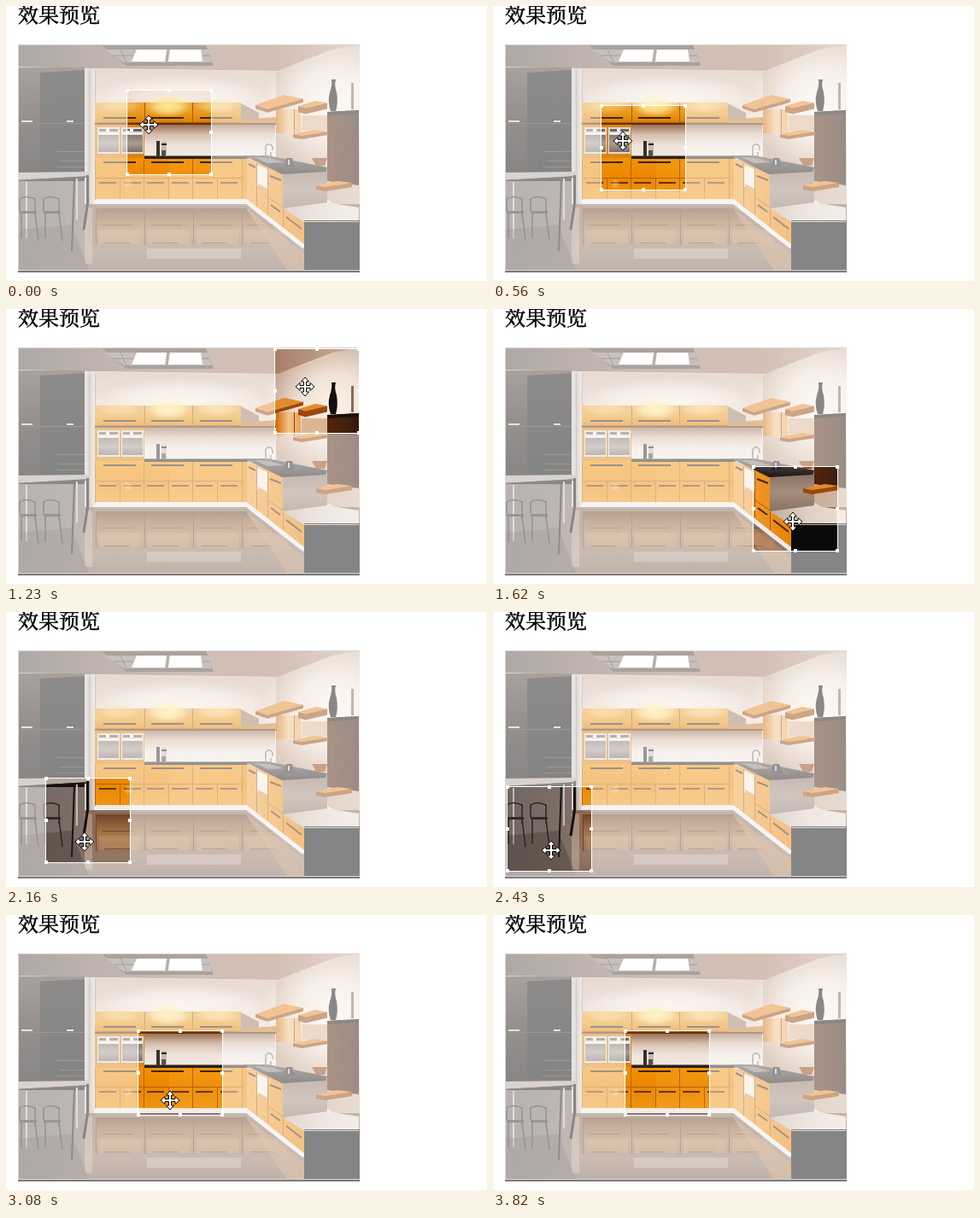
An HTML page with a canvas for the animation above (4610 ms loop, 563 px wide and 322 px high).

```html
<!DOCTYPE html>
<html lang="zh">
<head>
<meta charset="utf-8">
<style>
html, body { margin: 0; width: 563px; height: 322px; overflow: hidden; background: #fff; }
h2 { position: absolute; left: 14px; top: -8px; margin: 0; color: #000; white-space: nowrap;
  font: 400 24px/34px "Noto Serif CJK SC", "Noto Sans CJK SC", "Noto Sans CJK", serif;
  -webkit-text-stroke: .5px #000; }
canvas { position: absolute; left: 0; top: 0; }
</style>
</head>
<body>
<canvas id="stage" width="563" height="322"></canvas>
<h2>效果预览</h2>
<script>
const W = 563, H = 322, LOOP = 4610, SIZE = 100;
const FIRST_MOVE = 410, TICK = 134.4;
const IMG = [14, 45, 400, 266];
const ctx = document.getElementById('stage').getContext('2d');

// Drag path: tick, crop left, crop top, pointer offset inside the crop
const path = [
  [0, 141, 98, 26, 41], [1, 135, 119, 26, 41], [4, 108, 109, 27, 45],
  [6, 288, 57, 29, 43], [7, 314, 46, 36, 45], [9, 307, 157, 48, 60],
  [11, 301, 211, 46, 70], [13, 73, 190, 46, 75], [15, 18, 197, 46, 75],
  [17, 14, 211, 58, 74], [18, 91, 161, 59, 74], [20, 154, 135, 38, 82],
  [21, 154, 135, 38, 82], [22, 154, 135, 55, 92], [23, 154, 135, 237, 113],
  [24, 154, 135, 250, 126]
];

function poseAt(tick) {
  const i = path.findIndex(k => k[0] >= tick);
  if (i < 0) return path.at(-1).slice(1);
  const b = path[i], a = path[i - 1] || b;
  const u = (tick - a[0]) / (b[0] - a[0] || 1);
  return a.map((v, j) => Math.round(v + (b[j] - v) * u)).slice(1);
}

function makeScene() {
  const canvas = document.createElement('canvas');
  canvas.width = W;
  canvas.height = H;
  const c = canvas.getContext('2d');

  const grad = (x0, y0, x1, y1, ...colors) => {
    const g = c.createLinearGradient(x0, y0, x1, y1);
    colors.forEach((col, i) => g.addColorStop(i / (colors.length - 1), col));
    return g;
  };
  const down = (y, h, ...colors) => grad(0, y, 0, y + h, ...colors);
  const across = (x, w, ...colors) => grad(x, 0, x + w, 0, ...colors);
  const rect = (fill, x, y, w, h) => { c.fillStyle = fill; c.fillRect(x, y, w, h); };
  const shape = (fill, d) => { c.fillStyle = fill; c.fill(new Path2D(d)); };
  const line = (color, width, d) => {
    c.strokeStyle = color;
    c.lineWidth = width;
    c.stroke(new Path2D(d));
  };
  const glow = (x, y, rx, ry, rgb, a) => {
    c.save();
    c.translate(x, y);
    c.scale(rx, ry);
    const g = c.createRadialGradient(0, 0, 0, 0, 0, 1);
    g.addColorStop(0, `rgba(${rgb},${a})`);
    g.addColorStop(.5, `rgba(${rgb},${a * .75})`);
    g.addColorStop(1, `rgba(${rgb},0)`);
    rect(g, -1, -1, 2, 2);
    c.restore();
  };
  // tilted board with a dark front edge
  const shelf = (x, y, w, rise, h) => {
    shape('#e48a26', `M${x} ${y}l${w * .6} ${-rise}l${w * .4} ${rise * .4}l${-w * .75} ${rise}z`);
    shape('#9a480c', `M${x} ${y}l${w * .25} ${rise * .4}l${w * .75} ${-rise}v${h}l${-w * .75} ${rise}l${-w * .25} ${-rise * .4}z`);
  };

  c.beginPath();
  c.rect(...IMG);
  c.clip();

  // walls and ceiling
  rect(down(72, 100, '#cfb4a2', '#e3d2c5', '#efe4db'), 14, 45, 400, 266);
  shape(across(316, 98, '#bf9c85', '#d2b8a5'), 'M316 76L414 45V250L316 190Z');
  glow(382, 115, 82, 78, '255,247,238', .95);
  glow(205, 108, 105, 28, '255,246,235', .8);
  shape(across(14, 400, '#5d514b', '#80685d', '#a27f6b', '#a87f68', '#cdb09d'),
    'M14 45H414L382 51 318 76 104 73 14 71Z');
  line('#d8c4b6', 1, 'M104 73.5L318 76.5');

  // ceiling lamp
  shape('#54443b', 'M111 45H234L243 70H141Z');
  shape('#8f8178', 'M116 51H237L241 66H138Z');
  shape('#fff', 'M153 51H188L186 65H147ZM192 51H228L230 65H190Z');
  line('#493a32', 1, 'M126 58H149M190 51L188 66M230 58H239M134 51L141 66');

  // dark alcove and pillar
  rect(down(72, 120, '#50433d', '#2a211d', '#120e0d'), 14, 72, 78, 165);
  shape(down(76, 119, '#191615', '#080808'), 'M40 78L92 75V195H40Z');
  line('#3b332f', 1, 'M14 137.5H92M58 170.5H92M62 181.5H92M58 188.5H92');
  rect('#ddc89b', 18, 134, 13, 2);
  rect('#ddc89b', 71, 134, 8, 2);
  rect(across(92, 13, '#d9d0ca', '#c3b7af', '#e9e0d9'), 92, 73, 13, 163);
  line('#9d9088', 1, 'M97.5 76V234M104.5 74V232');

  // floor with reflections
  rect(down(232, 79, '#8a6752', '#8a6a57', '#947865', '#7f6455'), 14, 232, 400, 79);
  rect(across(14, 91, '#706661', '#807168'), 14, 205, 78, 106);
  shape(down(236, 44, '#6b4026', '#96643b', '#a87c53', '#8f6e59'), 'M105 237H281L320 280H105Z');
  for (let x = 105; x < 285; x += 57) {
    rect('rgba(215,160,100,.3)', x + 4, 262, 49, 17);
    line('#68452f', 1, `M${x + 8} 256.5h36M${x + 10} 277.5h30M${x}.5 238v42`);
  }
  rect('rgba(235,222,208,.3)', 165, 284, 110, 12);
  shape('rgba(190,140,98,.6)', 'M281 237L349 290V311H330Z');
  rect('rgba(230,220,212,.3)', 92, 236, 9, 66);

  // backsplash and upper cabinets
  rect(down(138, 38, '#96684a', '#d6bfae', '#eee3da', '#f1e9e2'), 162, 138, 153, 38);
  rect(down(113, 24, '#e8a136', '#ea9a1c', '#dd7d00'), 104, 113, 171, 24);
  glow(133, 117, 28, 9, '250,205,125', .6);
  glow(190, 117, 28, 13, '255,232,150', 1);
  glow(247, 117, 28, 9, '250,215,135', .75);
  line('#a55b00', 1, 'M162.5 113V137M218.5 113V137M104 136.5H275');
  rect('#643112', 104, 137, 212, 2);
  shape('#c97c2c', 'M275 133L316 130V137H275Z');
  shape('#a27d65', 'M275 114L296 125V133H275Z');

  // ovens
  rect('#dc8312', 104, 139, 58, 40);
  for (const x of [107, 135]) {
    rect('#e2d9d2', x, 142, 26, 31);
    rect('#6d6460', x + 2, 144, 22, 3);
    rect(down(151, 20, '#857870', '#a99c94', '#7b6e67'), x + 1, 151, 24, 20);
    line('#fff', 1, `M${x + 2} 149.5h22`);
    rect('#fff', x + 10, 144, 4, 3);
  }

  // base cabinets
  rect(down(178, 48, '#f09207', '#ec8600', '#ef9414'), 104, 178, 178, 48);
  rect('rgba(255,180,70,.18)', 191, 180, 84, 45);
  for (let i = 0; i < 7; i++) line('#b46400', 1, `M${Math.round(104 + i * 28.6)}.5 ${i % 2 ? 202 : 179}V226`);
  line('#b46400', 1, 'M104 201.5H278');
  for (const x of [114, 170, 227]) {
    line('#3b2411', 2, `M${x} 131h38M${x} 183h38`);
    line('#5f3610', 2, `M${x - 5} 207h20m9 0h20`);
  }
  glow(143, 208, 6, 6, '255,225,150', .4);
  line('#27211f', 3, 'M162 177.5H284');
  line('#8c7a6e', 1, 'M162 175.5H284');

  // corner run
  shape(across(282, 67, '#f0a23c', '#e98306'), 'M282 178L324 196 325 236 349 252V279L282 227Z');
  shape('#f4e9dd', 'M294 186L306 191V219L294 211Z');
  shape('#dc9b50', 'M295 208L306 214V220L295 213Z');
  line('#ac5b00', 1, 'M306.5 190V244M324.5 198V259M293.5 184V235M307 224L349 253');
  line('#46260d', 2, 'M284 185l8 4M309 199l13 5M310 233l11 8M328 247l18 14');
  line('#f0ece8', 5, 'M104 229.5H282L349 282');
  line('#8d8077', 1, 'M104 233.5H281L349 287');
  shape(down(194, 42, '#8d7566', '#a48d7e', '#8b7465'), 'M324 196L376 190V234L324 237Z');
  shape(down(175, 22, '#5f5752', '#1d1614'), 'M278 175H306L376 189 374 194 323 197Z');
  shape('#8a817a', 'M291 177L309 178 325 183 306 184Z');
  line('#777', 1.5, 'M304 177V164q5-5 8 1v4M310 176v-5');

  // tall block and pale worktop
  shape(across(376, 37, '#552309', '#44210f', '#33190d'), 'M376 124L413 122V210L376 205Z');
  shape('#1a110d', 'M376 124L413 122V126L376 128Z');
  shape(across(324, 89, '#bfae9f', '#ded0c4', '#e9ddd3'), 'M324 237L376 230 413 236V252L349 253Z');
  rect('#0c0b0b', 349, 251, 65, 60);
  line('#bdb2a9', 1, 'M349 252.5H413');

  // open shelves
  rect('#d9b796', 346, 128, 30, 18);
  rect(across(316, 30, '#cf6c0c', '#f3c48a', '#e9a155'), 316, 121, 29, 28);
  line('#8b4710', 1, 'M337.5 121V149');
  shelf(292, 116, 56, 12, 4);
  shelf(342, 117, 34, 6, 7);
  shelf(336, 150, 41, 5, 4);
  shelf(363, 210, 42, 5, 5);
  shape('#8e4513', 'M358 178h18l-3 9h-10z');

  // vases, coffee pot, kettle
  shape('#15100e', 'M381 86h5q-2 7 1 15 2 12-1 22h-6q-4-11-1-22 3-8 2-15z');
  shape('#88695a', 'M404 90h3v31h-3z');
  rect('#3a302b', 176, 158, 4, 19);
  rect('#c4b9b1', 182, 159, 6, 17);
  rect('#241c19', 182, 161, 6, 2);
  rect('#5a4e47', 182, 169, 5, 7);
  shape('#2a2428', 'M326 188l2-10h7l3 10z');
  rect('#b4b4d8', 330, 180, 2, 6);

  // dining set
  shape('#b3a8a2', 'M14 195L96 194 98 199 14 204Z');
  line('#1d1715', 1.5, 'M14 204.5L97 200');
  line('#c5bbb5', 2, 'M83 202V250M24 206V272');
  line('#130f0e', 3, 'M95.5 198V232L91 262');
  line('#171312', 2, 'M80 203L77 287');
  for (const x of [16, 44]) {
    line('#2b2421', 1.5, `M${x} 240V226q7-5 18 0V248M${x + 2} 242v30M${x + 18} 242l4 33`);
    rect('#342b27', x, 240, 20, 3);
  }
  shape('rgba(50,38,32,.3)', 'M14 262L76 256 98 311H14Z');
  return canvas;
}

const scene = makeScene();
const moveShape = new Path2D('M0-11L4.5-6H1.5V-1.5H6V-4.5L11 0 6 4.5V1.5H1.5V6H4.5L0 11-4.5 6H-1.5V1.5H-6V4.5L-11 0-6-4.5V-1.5H-1.5V-6H-4.5Z');
const arrowShape = new Path2D('M.5.5V16.5L4.2 13 7 18.5 9.3 17.5 6.7 12H11.5Z');

function drawPointer(outline, x, y) {
  ctx.save();
  ctx.translate(x, y);
  ctx.fillStyle = '#fff';
  ctx.strokeStyle = '#000';
  ctx.lineWidth = 1;
  ctx.fill(outline);
  ctx.stroke(outline);
  ctx.restore();
}

function drawCrop(x, y) {
  ctx.drawImage(scene, x, y, SIZE, SIZE, x, y, SIZE, SIZE);
  ctx.save();
  ctx.beginPath();
  ctx.rect(...IMG);
  ctx.clip();
  ctx.strokeStyle = ctx.fillStyle = '#fff';
  ctx.lineWidth = 1;
  ctx.strokeRect(x + .5, y + .5, SIZE - 1, SIZE - 1);
  for (let i = 0; i < 9; i++) {
    if (i !== 4) ctx.fillRect(x - 1 + i % 3 * 49, y - 1 + Math.floor(i / 3) * 49, 4, 4);
  }
  ctx.restore();
}

function draw(now) {
  const t = now % LOOP;
  const tick = Math.max(0, Math.floor((t - FIRST_MOVE) / TICK) + 1);
  // the first visible move lands on tick 1, the last one on tick 26
  const [x, y, dx, dy] = poseAt(t < FIRST_MOVE ? 0 : tick);
  ctx.clearRect(0, 0, W, H);
  ctx.drawImage(scene, 0, 0);
  ctx.fillStyle = 'rgba(255,255,255,.5)';
  ctx.fillRect(...IMG);
  ctx.fillStyle = '#d8d5d3';
  ctx.fillRect(14, 45, 400, 1);
  ctx.fillRect(14, 45, 1, 265);
  ctx.fillRect(14, 309, 400, 1);
  ctx.fillStyle = '#817977';
  ctx.fillRect(14, 310, 400, 2);
  drawCrop(x, y);
  if (tick < 23) drawPointer(moveShape, x + dx, y + dy);
  else if (tick < 26) drawPointer(arrowShape, x + dx, y + dy);
  requestAnimationFrame(draw);
}
requestAnimationFrame(draw);
</script>
</body>
</html>
```
